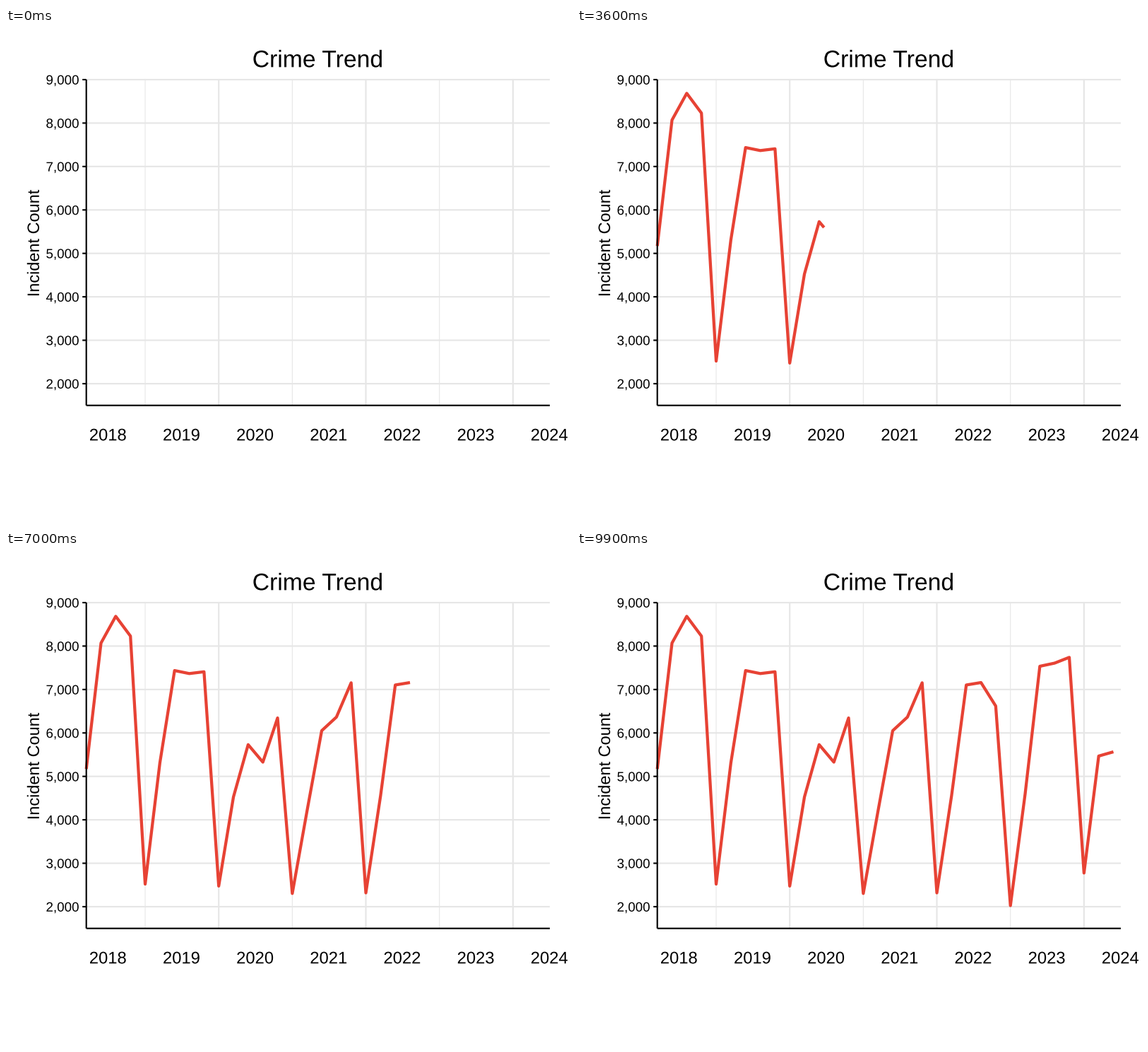
These frames come from a looping animation (800 by 700 pixels, 10 s). A matplotlib script:

```python
import numpy as np
import matplotlib.pyplot as plt
from matplotlib.animation import FuncAnimation
from matplotlib.patches import PathPatch
from matplotlib.textpath import TextPath
from matplotlib.transforms import Affine2D

W, H, DPI = 800, 700, 100
FRAMES, INTERVAL = 100, 100

LEFT, RIGHT, TOP, BOTTOM = 113.7, 770, 73, 533.7
STEP = 20.833
V_MIN, V_MAX = 1500, 9000

THIN, NORMAL, BOLD = 1.07, 2.13, 4.27
GRID, INK, RED = "#e6e6e6", "black", "#e74234"

COUNTS = np.array([
    5170, 8070, 8685, 8230,
    2520, 5310, 7436, 7367, 7408,
    2475, 4525, 5730, 5328, 6345,
    2304, 4200, 6052, 6365, 7155,
    2318, 4555, 7104, 7160, 6620,
    2025, 4595, 7535, 7607, 7740,
    2775, 5468, 5565,
])

plt.rcParams["font.family"] = "Liberation Sans"
plt.rcParams["path.snap"] = False

fig = plt.figure(figsize=(W / DPI, H / DPI), dpi=DPI, facecolor="white")
ax = fig.add_axes([0, 0, 1, 1])
ax.set_xlim(0, W)
ax.set_ylim(H, 0)
ax.axis("off")


def x_at(i):
    return LEFT + STEP * i


def y_at(v):
    return TOP + (V_MAX - v) * (BOTTOM - TOP) / (V_MAX - V_MIN)


def stroke(xs, ys, color, width, z):
    line, = ax.plot(xs, ys, color=color, lw=width * 72 / DPI, zorder=z,
                    solid_capstyle="butt", solid_joinstyle="round",
                    clip_on=False)
    return line


def write(text, x, y, size, align=0.5, angle=0):
    """Draw text on baseline y; align 0, 0.5 or 1 picks left, centre, right."""
    path = TextPath((0, 0), text, size=size)
    box = path.get_extents()
    place = (Affine2D().translate(-box.x0 - align * box.width, 0)
             .scale(1, -1).rotate_deg(-angle).translate(x, y))
    ax.add_patch(PathPatch(place.transform_path(path), fc=INK, lw=0, zorder=4))


# Grid, ticks and value labels
for v in range(2000, 9001, 1000):
    y = y_at(v)
    stroke([LEFT, RIGHT], [y, y], GRID, NORMAL, 1)
    stroke([LEFT - 5.5, LEFT], [y, y], INK, NORMAL, 3)
    write(f"{v:,}", 102.8, y + 6.8, 18.8, align=1)

for k in range(6):
    x = x_at(4 + 5 * k)
    stroke([x, x], [TOP, BOTTOM], GRID, NORMAL if k % 2 else THIN, 1)

# Axes
stroke([LEFT, LEFT], [TOP, BOTTOM], INK, NORMAL, 3)
stroke([LEFT, RIGHT], [BOTTOM, BOTTOM], INK, NORMAL, 3)

for k in range(7):
    write(str(2018 + k), 119 + 5 * STEP * k, 583.3, 23.8, align=0)

write("Crime Trend", 441.2, 55.3, 33.7)
write("Incident Count", 46.8, 303.5, 23.5, angle=90)

trend = stroke([], [], RED, BOLD, 2)

# Every point is reached on a whole frame, with even motion between points
index = np.arange(len(COUNTS))
arrival = np.round(index * (FRAMES - 1) / index[-1])


def update(frame):
    head = np.interp(frame, arrival, index)
    steps = np.append(np.arange(np.ceil(head)), head)
    trend.set_data(x_at(steps), y_at(np.interp(steps, index, COUNTS)))
    return trend,


anim = FuncAnimation(fig, update, frames=FRAMES, interval=INTERVAL,
                     repeat=True, repeat_delay=0)
plt.show()
```
